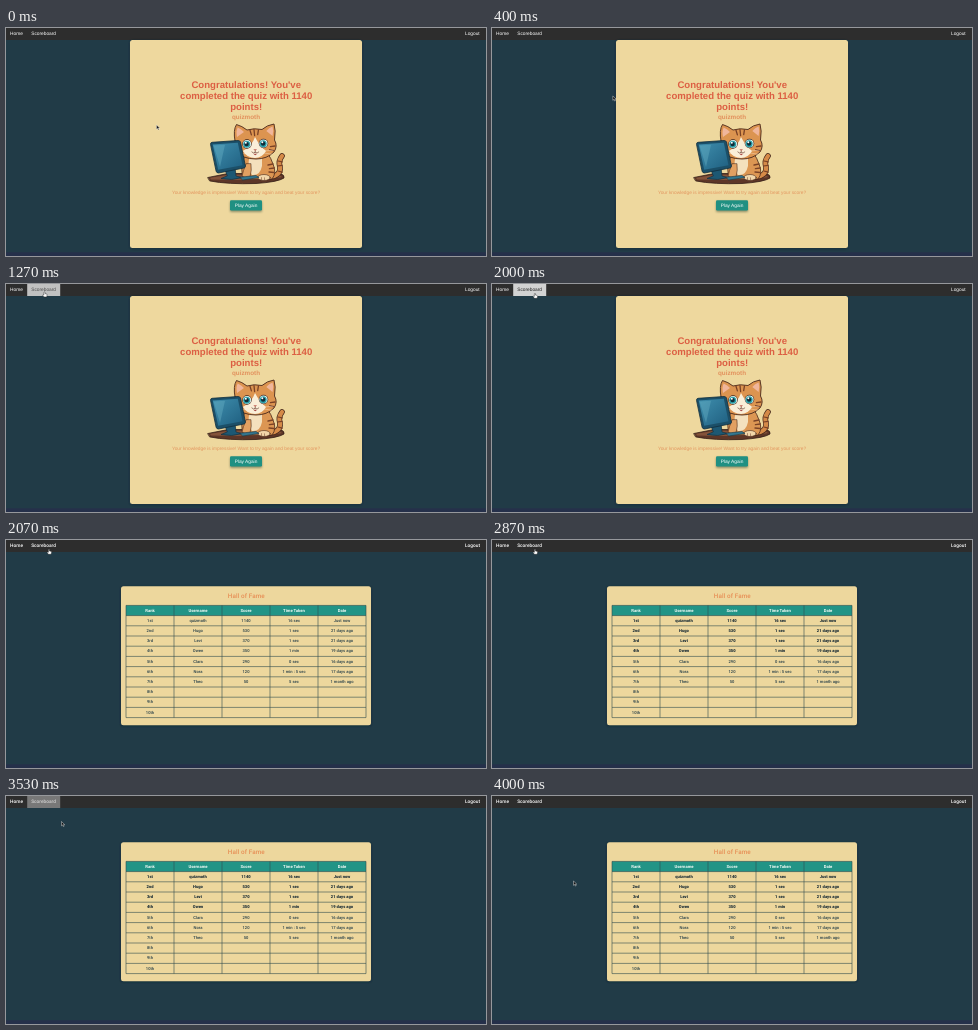
Write an HTML page that moves like this. It is 480 px wide and 228 px high and loops after 4070 ms.

```html
<!DOCTYPE html>
<html lang="en">
<head>
<meta charset="utf-8">
<title>Quiz scoreboard</title>
<style>
html, body { margin: 0; width: 100%; height: 100%; overflow: hidden; background: #213b47; }
svg { display: block; width: 100vw; height: 100vh; }
text { text-rendering: geometricPrecision; }
.arial { font-family: "Liberation Sans", Arial, sans-serif; }
.table { font-family: Roboto, sans-serif; font-weight: 500; }
.mid { text-anchor: middle; }
.nav { font-size: 4.8px; fill: #fff; }
.title { font-size: 9.6px; font-weight: 700; fill: #dc5f43; }
.head { font-size: 4.2px; font-weight: 700; fill: #f4fbf6; }
.cell { font-size: 4.1px; fill: #263f49; }
.bold { font-weight: 800; fill: #1b2d36; }
</style>
</head>
<body>
<svg viewBox="0 0 480 228" preserveAspectRatio="none">
  <defs>
    <linearGradient id="screen" x1="0" y1="0" x2="1" y2="1">
      <stop offset="0" stop-color="#3f8fae"/>
      <stop offset="1" stop-color="#1f5f80"/>
    </linearGradient>
    <filter id="soft" x="-20%" y="-20%" width="140%" height="160%">
      <feGaussianBlur stdDeviation="1"/>
    </filter>
  </defs>
  <rect width="480" height="228" fill="#213b47"/>
  <rect y="224.3" width="480" height="3.7" fill="#25304a"/>
  <rect width="480" height="12" fill="#2d2d2d"/>
  <rect id="hover" x="21.2" width="33" height="12" fill="#d2d2d2" opacity="0"/>
  <g id="nav" class="arial">
    <text class="nav" x="4.1" y="7.4">Home</text>
    <text class="nav" id="link" x="25.2" y="7.4">Scoreboard</text>
    <text class="nav" x="459" y="7.4">Logout</text>
  </g>

  <g id="result" class="arial mid">
    <rect x="124" y="12.5" width="232" height="208" rx="2.5" fill="#172c36" filter="url(#soft)"/>
    <rect x="124" y="12" width="232" height="208" rx="2.5" fill="#eed89e"/>
    <text class="title" x="240.2" y="60">Congratulations! You've</text>
    <text class="title" x="240.2" y="71">completed the quiz with 1140</text>
    <text class="title" x="240.2" y="82">points!</text>
    <text x="240" y="91.4" font-size="6.3" font-weight="700" fill="#e2905c">quizmoth</text>

    <g stroke-linejoin="round" stroke-linecap="round">
      <!-- desk -->
      <path d="M202 149.5L222 145.5H274Q279 147 278 150Q272 154 250 155.5Q222 156.5 204 153Z" fill="#5d3627" stroke="#352019" stroke-width=".8"/>
      <path d="M204 149.8L223 146.8H272L276 149Q255 153 205 151.5Z" fill="#84533a"/>
      <!-- tail and body -->
      <path d="M263 149Q275 148 274 139Q272 133 276 128" fill="none" stroke="#442619" stroke-width="5.6"/>
      <path d="M263 149Q275 148 274 139Q272 133 276 128" fill="none" stroke="#d58a48" stroke-width="4.2"/>
      <path d="M271.8 143l4.6 1.2M271.4 138l4.8-.6M272 133l4.4.8" stroke="#7a4226" stroke-width="1.2"/>
      <path d="M239 127Q233 143 238 151H266Q271 145 267 136Q265 130 262 126Z" fill="#dc9653" stroke="#4a2a1c" stroke-width=".8"/>
      <path d="M244 128Q240 139 246 147Q254 148 256 138L256 128Z" fill="#f4e0bd"/>
      <path d="M267 136l-5 1M268.4 140l-5 .6M268 144.5l-5-.5" stroke="#7a4226" stroke-width="1.3"/>
      <path d="M240 136Q237 143 236 148Q239 151 244 149Q246 142 245 136Z" fill="#e2a061" stroke="#4a2a1c" stroke-width=".6"/>
      <ellipse cx="258" cy="149.5" rx="6.2" ry="3" fill="#f1d6aa" stroke="#4a2a1c" stroke-width=".6"/>
      <path d="M255.5 149.6v2M258.5 149.8v2" stroke="#6b3d28" stroke-width=".5"/>
      <!-- head -->
      <path d="M229 113Q227 102 230.5 96.5Q236 98 241 102Q248 99.8 256 101.5Q261 97 268 96Q270 102 268.5 112Q272 118 268 124Q261 131 250 131Q236 131 230 123Q227 118 229 113Z" fill="#dc9450" stroke="#4a2a1c" stroke-width=".9"/>
      <path d="M231 109Q229.8 103 231.7 99.5Q235.5 101.2 238 104Z M260.3 103Q263 99.5 266.6 98.5Q268 103 266.6 108Z" fill="#f0b69b"/>
      <path d="M248 101.5l.6 6M244 102.2l1.4 4.7M252.5 101.7l-.8 5M229.5 119l5 .6M230 123l4.8-1.2M269 118l-4.6.7M268 122.6l-4.4-1" stroke="#7a4226" stroke-width="1.3"/>
      <path d="M249 109Q253 117 260 123Q256 130 249 130Q241 130 237 123Q246 118 249 109Z" fill="#faeed8"/>
      <g id="eyes"></g>
      <path d="M247.4 121.3h3.6l-1.8 1.7Z" fill="#c26358"/>
      <path d="M249.2 123v1.2M245.8 124Q247.5 126 249.2 124.2Q251 126 252.8 124" fill="none" stroke="#5a3022" stroke-width=".6"/>
      <path d="M247.5 125.8Q249.2 128.6 251 125.8Z" fill="#a94a46"/>
      <path d="M240 123l-8-.4M240.4 125l-7.4 1.6M258 123l9-.8M258 125l8 1.2" stroke="#fff4df" stroke-width=".35"/>
      <!-- computer -->
      <path d="M219 141L229 139.5L230 148L236 149.6Q226 153 215 150.5L221 148Z" fill="#1d5873" stroke="#15313f" stroke-width=".7"/>
      <path d="M204.5 116Q204.5 114.5 206 114.3L232 112.5Q234 112.5 234.5 114L239.4 138Q239.4 139.7 238 140L212.5 145Q210.7 145 210.2 143.5Z" fill="#1b4f68" stroke="#122f3e" stroke-width=".8"/>
      <path d="M206.7 116.6L231.8 114.7L236.5 137.2L212.2 141.8Z" fill="url(#screen)"/>
      <path d="M207.6 117.6L219 116.7L214 139Z" fill="#73b9cb" opacity=".35"/>
      <path d="M234 149.2L250 147.5L253 149.5L237 152Z" fill="#34778f" stroke="#163646" stroke-width=".6"/>
    </g>

    <text x="240" y="166" font-size="4.8" fill="#e3965f">Your knowledge is impressive! Want to try again and beat your score?</text>
    <rect x="224" y="173.5" width="32" height="10.5" rx="1.3" fill="#6d7657" opacity=".75" filter="url(#soft)"/>
    <rect x="224" y="172.2" width="32" height="10.3" rx="1.2" fill="#1f9082"/>
    <text x="240" y="179.1" font-size="4.8" fill="#fff">Play Again</text>
  </g>

  <g id="scores" class="table mid">
    <rect x="115" y="46.8" width="250" height="139" rx="2.5" fill="#162b35" filter="url(#soft)"/>
    <rect x="115" y="46.2" width="250" height="139" rx="2.5" fill="#edd79d"/>
    <text x="240.3" y="58.4" font-size="6.3" letter-spacing=".1" fill="#e78f56">Hall of Fame</text>
    <rect x="120" y="65.4" width="240" height="10.2" fill="#229486"/>
    <g id="grid" stroke="#304c4d" stroke-width=".6"></g>
    <g id="cells"></g>
  </g>

  <g id="cursor">
    <path id="arrow" d="M0 0V4.3L1.1 3.4L1.8 5L2.6 4.7L1.9 3.1H3.2Z" fill="#111" stroke="#e9e9e9" stroke-width=".45"/>
    <path id="hand" d="M-.6 .3Q0 -.4 .5 .3V1.8Q2.6 1.7 2.6 3L2.1 5H-.6L-1.9 3.2Q-1.6 2.4 -.6 3Z" fill="#fff" stroke="#161616" stroke-width=".4"/>
  </g>
</svg>
<script>
const LOOP = 4070, SWITCH = 2070, STEP = 200 / 3;
const $ = id => document.getElementById(id);

function add(parent, tag, attrs, label) {
  const el = document.createElementNS("http://www.w3.org/2000/svg", tag);
  for (const key in attrs) el.setAttribute(key, attrs[key]);
  if (label) el.textContent = label;
  return $(parent).appendChild(el);
}

for (const [x, y] of [[241, 116], [257.5, 115.5]]) {
  const disc = (dx, dy, r, fill) => add("eyes", "circle", { cx: x + dx, cy: y + dy, r, fill });
  disc(0, 0, 4.7, "#38241d");
  disc(0, 0, 4.1, "#eefaf4");
  disc(-.3, .2, 3.5, "#2ba0ab");
  disc(-.4, .1, 2.2, "#102b36");
  disc(-1.2, -1.2, 1, "#fff");
}

const rows = [
  ["1st", "quizmoth", "1140", "16 sec", "Just now"],
  ["2nd", "Hugo", "530", "1 sec", "21 days ago"],
  ["3rd", "Levi", "370", "1 sec", "21 days ago"],
  ["4th", "Owen", "350", "1 min", "19 days ago"],
  ["5th", "Clara", "290", "0 sec", "16 days ago"],
  ["6th", "Nora", "120", "1 min : 5 sec", "17 days ago"],
  ["7th", "Theo", "50", "5 sec", "1 month ago"],
  ["8th"], ["9th"], ["10th"]
];
const ROW = 10.2, TOP = 75.6, COL = 48;
const sharp = [];

["Rank", "Username", "Score", "Time Taken", "Date"].forEach((name, c) =>
  add("cells", "text", { class: "head", x: 144 + c * COL, y: 71.7 }, name));
rows.forEach((row, r) => row.forEach((value, c) => {
  const el = add("cells", "text", { class: "cell", x: 144 + c * COL, y: TOP + r * ROW + 6.2 }, value);
  if (r < 4) sharp.push({ el, at: r < 3 && (c === 2 || c === 3) ? 2470 : 2670 });
}));
for (let i = 0; i <= 11; i++) {
  const y = TOP + (i - 1) * ROW;
  add("grid", "path", { d: `M120 ${y}H360` });
}
for (let i = 0; i <= 5; i++) add("grid", "path", { d: `M${120 + i * COL} 65.4V${TOP + 10 * ROW}` });

// [time, x, y] of the pointer tip
const path = [
  [0, 150.5, 97], [70, 149, 95.5], [330, 128, 75], [530, 107.5, 55], [870, 59, 22],
  [1070, 37, 7.5], [1330, 39, 8], [1600, 43, 9.3], [3200, 43, 9.3], [3400, 47, 12.5],
  [3530, 55.5, 25.5], [3730, 67, 53], [3930, 80, 82], [4000, 81.5, 85], [LOOP, 81.5, 85]
];
// [time, strength] of the link highlight
const glow = [
  [0, 0], [1000, 0], [1300, 1], [2069, 1], [SWITCH, 0], [3200, 0],
  [3400, .8], [3530, .45], [3670, 0], [LOOP, 0]
];

function sample(keys, t) {
  let i = 1;
  while (i < keys.length - 1 && keys[i][0] <= t) i++;
  const a = keys[i - 1], b = keys[i];
  const p = (t - a[0]) / (b[0] - a[0]);
  return a.slice(1).map((v, k) => v + (b[k + 1] - v) * p);
}

function draw(now) {
  // the picture advances fifteen times a second
  const t = Math.round(Math.floor((now % LOOP + 4) / STEP) * STEP / 10) * 10;
  const second = t >= SWITCH;
  $("result").style.display = second ? "none" : "";
  $("scores").style.display = second ? "" : "none";
  $("nav").setAttribute("class", second ? "table" : "arial");

  const [strength] = sample(glow, t);
  const ink = Math.round(255 - 225 * strength ** 2);
  $("hover").setAttribute("opacity", strength);
  $("link").style.fill = `rgb(${ink},${ink},${ink})`;

  const [x, y] = sample(path, t);
  const over = y < 12 && x > 21 && x < 54;
  $("cursor").setAttribute("transform", `translate(${x} ${y})`);
  $("arrow").style.display = over ? "none" : "";
  $("hand").style.display = over ? "" : "none";

  for (const { el, at } of sharp) el.classList.toggle("bold", t >= at);
}

let start;
function tick(now) {
  start ??= now;
  draw(now - start);
  requestAnimationFrame(tick);
}
draw(0);
requestAnimationFrame(tick);
</script>
</body>
</html>
```
